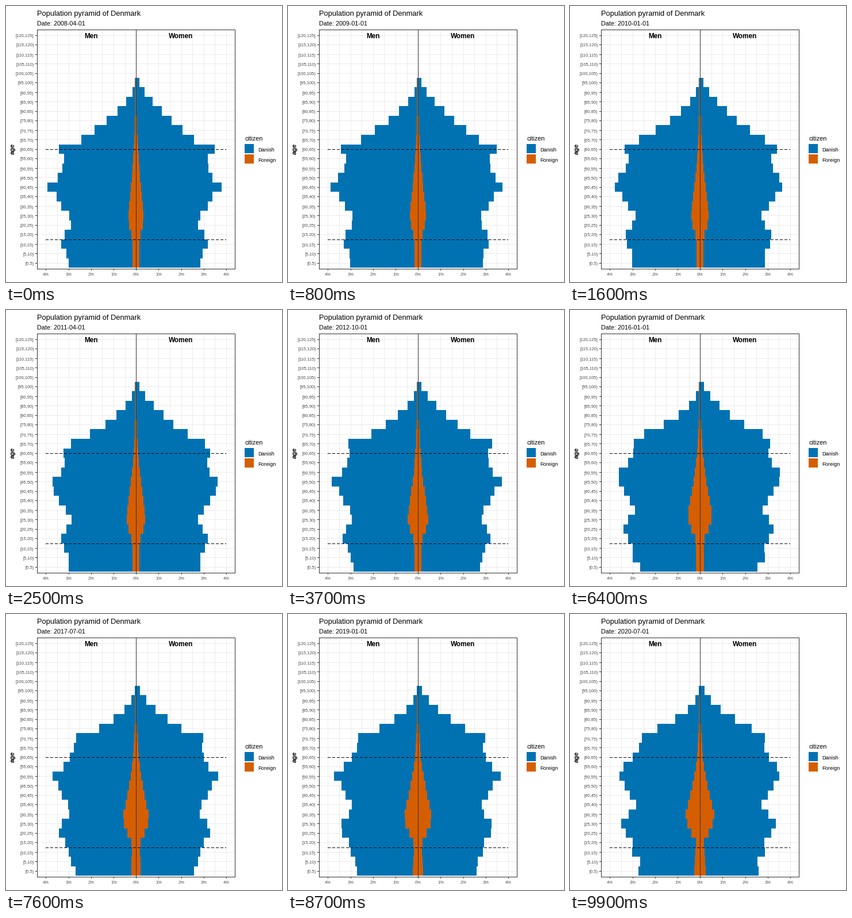
A matplotlib script for the animation above (10 s loop, 480 px wide and 480 px high).

```python
import numpy as np
import matplotlib.pyplot as plt
from matplotlib.animation import FuncAnimation
from matplotlib.patches import Rectangle

plt.rcParams["font.family"] = "Liberation Sans"

BLUE, ORANGE = "#0072B2", "#D55E00"
GRID, DARK, GREY = "#EBEBEB", "#333333", "#4D4D4D"
LEFT, RIGHT, TOP, BOTTOM = 54, 398, 41, 457
AXIS = 226                    # pixel column where both halves meet
CENTER, PCT = 226.2, 39.2     # zero and pixels per percent on the x scale
BASE, ROW = 455.2, 16.515     # bottom of the lowest bar, row height
GROUPS, FILLED = 25, 20
FRAMES, START, YEARS = 100, 2008.25, 12.25

AGES = 5 * np.arange(FILLED) + 2.5

# Cohort size (pixels) by year of birth: post-war, 1960s and 1990s booms.
COHORTS = np.array([
    (1915, 66), (1925, 82), (1934, 96), (1938.5, 113), (1941, 116),
    (1945, 148), (1947, 148), (1950.5, 130), (1956, 127), (1960.5, 131),
    (1966, 147), (1970, 131), (1974, 125.5), (1983, 104.5), (1985, 108),
    (1993, 129.5), (1995.5, 131), (2003, 117), (2008.5, 118), (2013, 104),
    (2018, 107),
])


def population(year, scale, hazard):
    """Cohort size, grown by young immigrants, cut by Gompertz mortality."""
    born = np.interp(year - AGES, *COHORTS.T)
    arrivals = 1 + 0.085 / (1 + np.exp((24 - AGES) / 2.5))
    survival = np.exp(-hazard * np.exp(0.087 * (AGES - 55)))
    return scale * born * arrivals * survival


def foreign(year):
    """Skewed hump of working ages that grows, plus a low level of children."""
    s = (year - START) / YEARS
    x = AGES - (27 + 5 * s)
    rise = np.exp(-(x / 13) ** 2)
    fall = np.exp(-(np.maximum(x, 0) / (29 - 7 * s)) ** 1.3)
    hump = (13.5 + 11.5 * s) * np.where(x < 0, rise, fall)
    children = 5.5 + s * s * (5 - AGES / 5)
    return np.where(AGES < 20, np.maximum(hump, children), hump)


fig = plt.figure(figsize=(480 / 72, 480 / 72), dpi=72, facecolor="white")
ax = fig.add_axes([0, 0, 1, 1])
ax.set(xlim=(0, 480), ylim=(480, 0))
ax.axis("off")


def box(x, y, w, h, color, z=2):
    return ax.add_patch(Rectangle((x, y), w, h, fc=color, lw=0, aa=False, zorder=z))


def hline(y, x0, x1, color, z=1):
    box(x0, y, x1 - x0, 1, color, z)


def vline(x, y0, y1, color, z=1):
    box(x, y0, 1, y1 - y0, color, z)


def label(x, y, text, size, color="black", ha="left", **kw):
    return ax.text(x, y, text, fontsize=size, color=color, ha=ha,
                   va=kw.pop("va", "baseline"), zorder=6, **kw)


# Grid, ticks and axis labels
for half in range(-8, 9):
    x = round(CENTER + half * PCT / 2)
    vline(x, TOP, BOTTOM, GRID)
    if half % 2 == 0:
        vline(x, BOTTOM, BOTTOM + 3, DARK)
        label(x + 0.5, 469, f"{abs(half) // 2}%", 7.6, GREY, "center")
for g in range(GROUPS):
    y = round(BASE - (g + 0.5) * ROW)
    hline(y, LEFT, RIGHT, GRID)
    hline(y, LEFT - 3, LEFT, DARK)
    end = "]" if g == GROUPS - 1 else ")"
    label(48.5, y + 3.5, f"[{5 * g},{5 * g + 5}{end}", 7.6, GREY, "right")

# Panel border, zero axis and dashed guides
for y in (TOP, BOTTOM):
    hline(y, LEFT, RIGHT + 1, DARK, 5)
for x in (LEFT, RIGHT):
    vline(x, TOP, BOTTOM + 1, DARK, 5)
vline(AXIS, TOP, BOTTOM, DARK, 5)
for y in (249, 406):
    for x in range(69, 383, 8):
        hline(y, x, min(x + 5, 383), "black", 4)

# Titles and legend
label(54, 17, "Population pyramid of Denmark", 12.9)
date = label(54, 34, "", 10.8)
label(148, 56, "Men", 11.8, ha="center", weight="bold")
label(304, 56, "Women", 11.8, ha="center", weight="bold")
label(12, 248, "age", 11, ha="center", va="center", rotation=90, weight="bold")
label(415, 233.5, "citizen", 11)
for y, color, name in ((240, BLUE, "Danish"), (258, ORANGE, "Foreign")):
    box(415, y, 16, 16, color)
    label(438, y + 13, name, 9.1)


def bars(color, z):
    edges = [round(BASE - g * ROW) for g in range(FILLED + 1)]
    return [box(AXIS, top, 0, low - top, color, z) for low, top in zip(edges, edges[1:])]


men, women = bars(BLUE, 2), bars(BLUE, 2)
foreign_men, foreign_women = bars(ORANGE, 3), bars(ORANGE, 3)


def resize(rects, lengths, side):
    for rect, w in zip(rects, np.rint(lengths)):
        rect.set_width(side * w)


def update(k):
    t = max(0, (k - 1) / 2)   # quarters since 2008-04
    year = START + t / 4
    resize(men, population(year, 1, 0.094), -1)
    resize(women, population(year, 0.958, 0.059), 1)
    abroad = foreign(year)
    resize(foreign_men, abroad, -1)
    resize(foreign_women, abroad, 1)
    years, quarter = divmod(int(t) + 1, 4)
    date.set_text(f"Date: {2008 + years}-{3 * quarter + 1:02d}-01")
    return []


anim = FuncAnimation(fig, update, frames=FRAMES, interval=100, repeat=True, repeat_delay=0)
plt.show()
```
